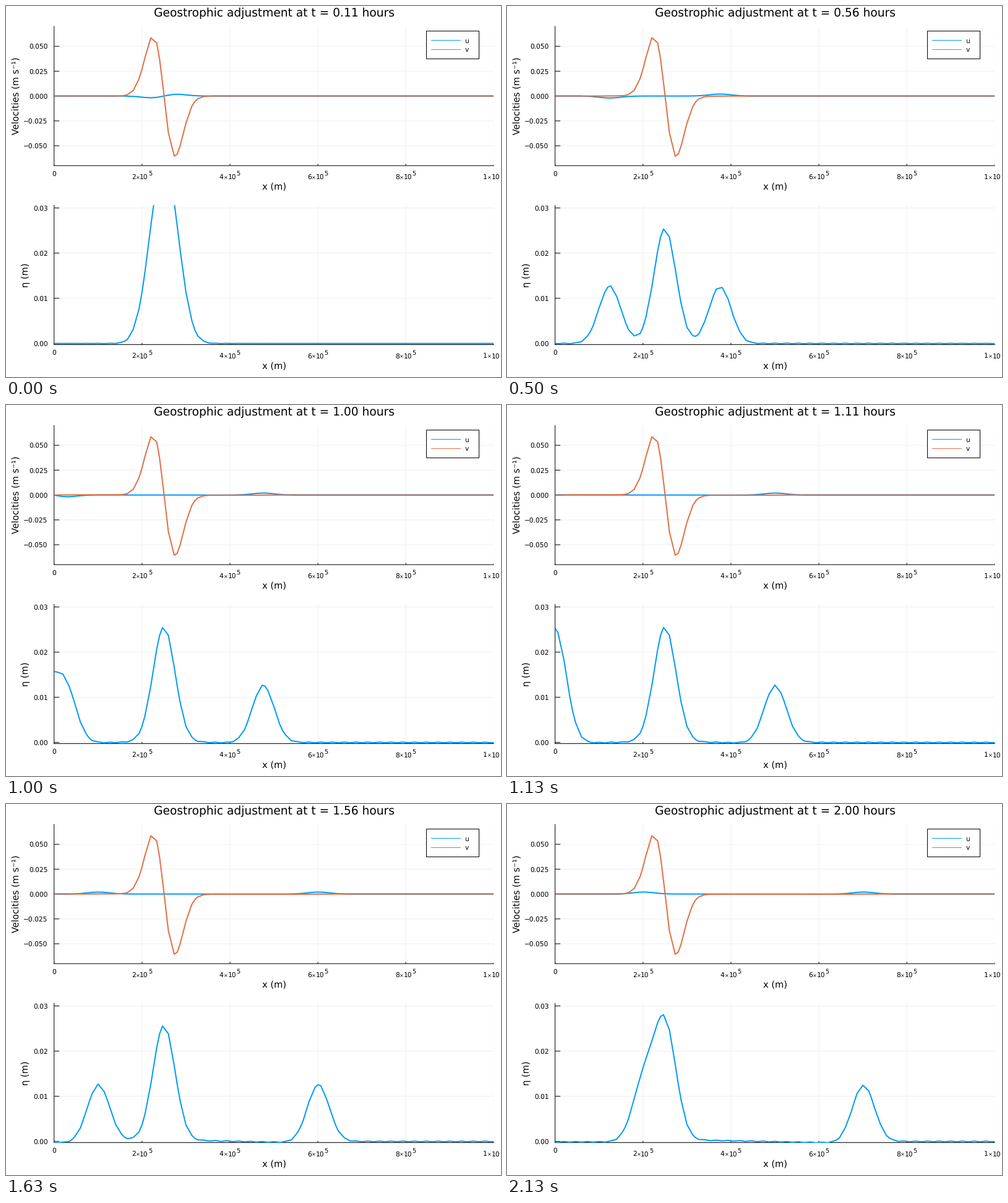
Animation of 800x600 px, one loop 2260 ms. Source, as a matplotlib script:

```python
import numpy as np
import matplotlib.pyplot as plt
from matplotlib.animation import FuncAnimation
from matplotlib.lines import Line2D
from matplotlib.patches import Rectangle
from matplotlib.transforms import Affine2D

W, H, DPI = 800, 600, 100
PX = 72 / DPI                      # one pixel in points
LOOP_MS, TICK_MS = 2260, 20
STEPS, STEP_MS = 18, 125           # model outputs and how long each one holds
BLUE, ORANGE, MIXED = "#009af9", "#e26f46", "#a08585"
LEFT, RIGHT = 77.7, 788.3
TOPS, HEIGHT = (33.0, 322.4), 225.2

plt.rcParams.update({"font.family": "DejaVu Sans", "text.hinting": "none", "path.snap": False})

# Linear rotating shallow water between two walls
L, X0, SIGMA = 1e6, 2.5e5, 2.5e4
G, F, DEPTH, U0 = 9.81, 1e-4, 400.0, 0.1
ETA0 = F * U0 * SIGMA / G

# Output nodes: 25 cells of six steps, keeping four points in each
NODE = np.append((6 * np.arange(25)[:, None] + [0, 1, 3, 5]).ravel(), 150)
X = L * NODE / 150

K = np.pi * np.arange(140) / L
OMEGA = np.sqrt(F**2 + G * DEPTH * K**2)
AMP = 2 / L * ETA0 * SIGMA * np.sqrt(2 * np.pi) * np.exp(-(K * SIGMA)**2 / 2) * np.cos(K * X0)
AMP[0] /= 2
COS, SIN = np.cos(np.outer(X, K)), np.sin(np.outer(X, K))

BELL = np.exp(-((X - X0) / SIGMA)**2 / 2)
ETA_G = ETA0 * BELL
V_G = -U0 * (X - X0) / SIGMA * BELL


def state(hours):
    """Velocities and surface height: balanced bump plus gravity waves."""
    phase = OMEGA * hours * 3600
    eta = ETA_G + COS @ (AMP * (F**2 + G * DEPTH * K**2 * np.cos(phase)) / OMEGA**2)
    u = SIN @ (AMP * G * K / OMEGA * np.sin(phase))
    v = V_G - SIN @ (AMP * F * G * K / OMEGA**2 * (1 - np.cos(phase)))
    reach = 1.2e6 * hours
    ripple = 8e-5 * np.cos(np.pi * (NODE - 3) / 2) * np.exp(-((X - X0) / reach)**2)
    return u, v, eta + ripple * (1 - BELL)


fig = plt.figure(figsize=(W / DPI, H / DPI), dpi=DPI, facecolor="white")
pixels = Affine2D().scale(1 / W, -1 / H).translate(0, 1) + fig.transFigure


def label(x, y, s, size, ha="center", **kw):
    return fig.text(x / W, 1 - y / H, s, fontsize=size * PX, ha=ha, va="baseline",
                    rotation_mode="anchor", **kw)


def power_label(x, y, mantissa):
    label(x - 17, y, mantissa, 10.67, ha="left")
    label(x - 10.2, y, "×", 8, ha="left")
    label(x - 3.5, y, "10", 10.67, ha="left")
    label(x + 10.1, y - 6, "5", 9.8, ha="left")


def panel(top, ylim, yticks, fmt):
    bottom, span = top + HEIGHT, ylim[1] - ylim[0]
    xticks = np.arange(6) * 2e5
    ax = fig.add_axes([LEFT / W, 1 - bottom / H, (RIGHT - LEFT) / W, HEIGHT / H])
    ax.set(xlim=(0, L), ylim=ylim, xticks=xticks, yticks=yticks)
    ax.set_facecolor("none")
    ax.set_axisbelow(True)
    ax.grid(color="#efefef", lw=PX)
    ax.tick_params(length=0, labelbottom=False, labelleft=False)
    ax.hlines(yticks, 0, 0.012 * L, color="black", lw=PX, zorder=1)
    ax.vlines(xticks, ylim[0], ylim[0] + 0.012 * span, color="black", lw=PX, zorder=1)
    for side, spine in ax.spines.items():
        spine.set_visible(side in ("left", "bottom"))
        spine.set(linewidth=PX, zorder=1)
    ax.set(xlim=(0, L), ylim=ylim)

    for y in yticks:
        row = bottom - HEIGHT * (y - ylim[0]) / span
        label(67.5, row + 4, format(y, fmt).replace("-", "\u2212"), 10.67, ha="right")
    label(LEFT, bottom + 16.5, "0", 10.67)
    for n in range(1, 6):
        power_label(LEFT + (RIGHT - LEFT) * n / 5, bottom + 21.8, str(2 * n if n < 5 else 1))
    label(433.3, bottom + 39.3, "x (m)", 14.67)
    return ax


def legend():
    fig.add_artist(Rectangle((679.5, 40.5), 85, 45, fc="white", ec="black", lw=PX, transform=pixels))
    for name, color, y in (("u", BLUE, 55.5), ("v", ORANGE, 70.5)):
        fig.add_artist(Line2D([687.5, 734.5], [y, y], color=color, lw=PX, transform=pixels))
        label(741.5, y + 4, name, 10.67, ha="left")


def curve(ax, color):
    return ax.plot([], [], color=color, lw=2 * PX, zorder=3)[0]


top_ax = panel(TOPS[0], (-0.07, 0.07), np.arange(-2, 3) * 0.025, ".3f")
low_ax = panel(TOPS[1], (-0.01 * ETA0, 1.2 * ETA0), np.arange(4) * 0.01, ".2f")
label(20.7, 145.5, "Velocities (m s⁻¹)", 14.67, rotation=90)
label(36.3, 435.5, "η (m)", 14.67, rotation=90)
legend()

title = label(433, 17.4, "", 18.6)
u_line, v_line = curve(top_ax, BLUE), curve(top_ax, ORANGE)
both_line = curve(top_ax, MIXED)
eta_line = curve(low_ax, BLUE)


def draw(i):
    step = min(int((i + 0.5) * TICK_MS / STEP_MS), STEPS - 1)
    hours = (step + 1) / 9
    u, v, eta = state(hours)
    title.set_text(f"Geostrophic adjustment at t = {hours:.2f} hours")
    u_line.set_data(X, u)
    v_line.set_data(X, v)
    both_line.set_data(X, np.where(np.abs(u - v) < 8e-5, v, np.nan))
    eta_line.set_data(X, eta)
    return title, u_line, v_line, both_line, eta_line


anim = FuncAnimation(fig, draw, frames=LOOP_MS // TICK_MS, interval=TICK_MS,
                     repeat=True, repeat_delay=0, blit=False)
plt.show()
```
